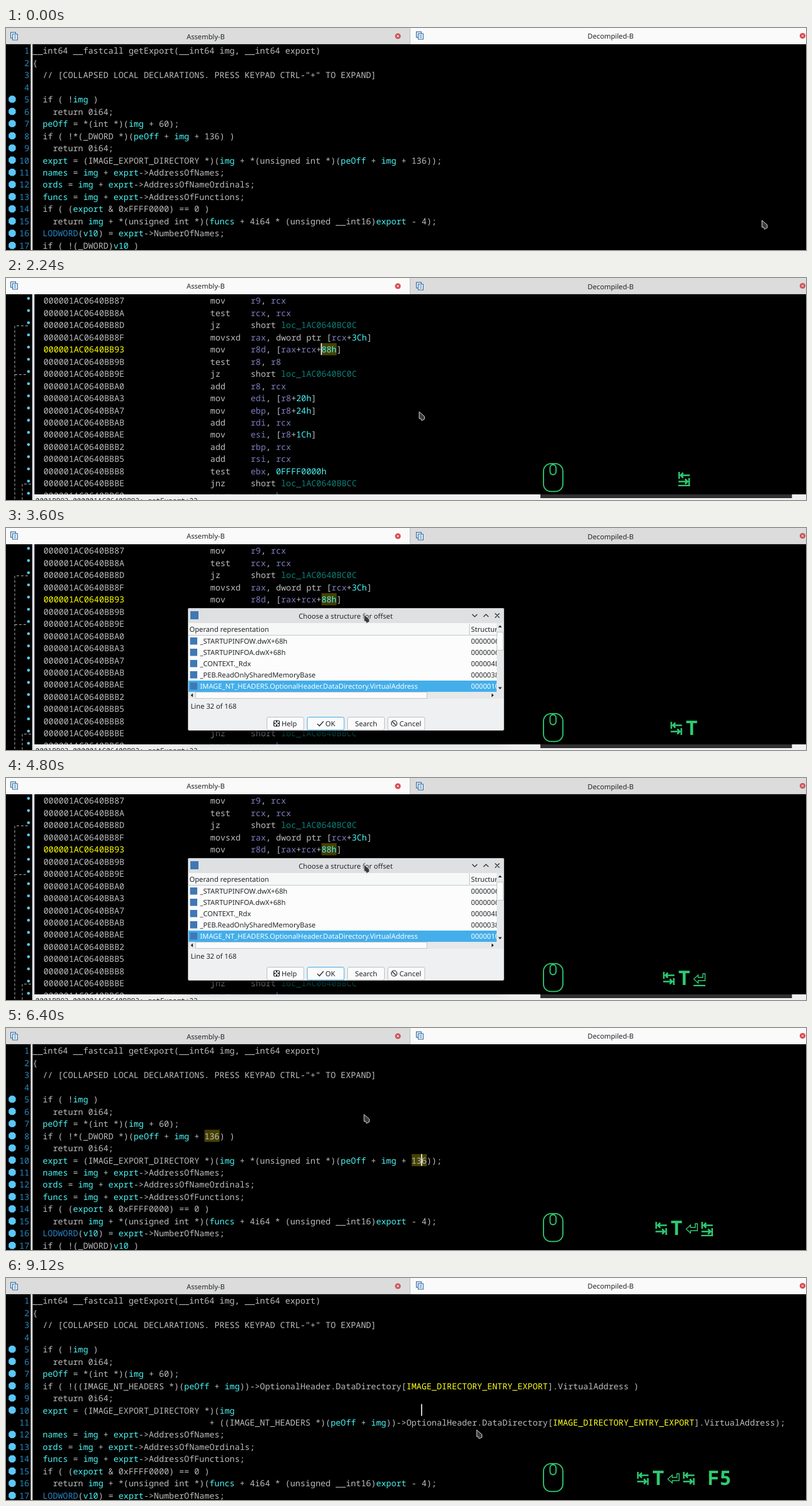
These frames come from a looping animation (1280x355 px, 9200 ms). An HTML page:

```html
<!DOCTYPE html>
<html lang="en">
<head>
<meta charset="utf-8">
<title>Structure offset demo</title>
<style>
  html, body { margin: 0; width: 100%; height: 100%; overflow: hidden; background: #000; }
  svg { display: block; width: 100vw; height: 100vh; }
  text { white-space: pre; text-rendering: geometricPrecision; font: 11.2px "Noto Sans", sans-serif; fill: #232629; }
  .mono { font: 13.477px "Noto Sans Mono", monospace; fill: #bdbdbd; }
  .var { fill: #4df3f3; }
  .macro { fill: #2a86c8; }
  .const { fill: #ffff20; }
  .reg { fill: #7d7dbd; }
  .loc { fill: #0c7f78; }
  .member { fill: #eeee86; }
  .num { fill: #2488c4; text-anchor: end; }
  .here { fill: #ffff00; }
  .mid { text-anchor: middle; }
  .picked { fill: #fff; }
  .status { font: 11.1px "Noto Sans Mono", monospace; }
  .key { font: bold 32px "Noto Sans Mono", monospace; fill: #2ecc71; text-anchor: middle; }
</style>
</head>
<body>
<svg id="stage" viewBox="0 0 1280 355"></svg>
<script>
const LOOP = 9200, STEP = 80;
const CHAR = 8.086, PITCH = 19.48, TOP = 26.3, CODE_X = 42.6, ASM_X = 60;
const GREEN = '#2ecc71', DARK = '#232629';

const rowTop = row => TOP + row * PITCH;
const rect = (x, y, w, h, fill, extra = '') =>
  `<rect x="${x}" y="${y}" width="${w}" height="${h}" fill="${fill}" ${extra}/>`;
const path = (d, stroke, width = 1, extra = 'fill="none"') =>
  `<path d="${d}" stroke="${stroke}" stroke-width="${width}" ${extra}/>`;
const text = (x, y, content, cls = '') => `<text x="${x}" y="${y}" class="${cls}">${content}</text>`;
const mono = (x, row, content, cls = '') => text(x, rowTop(row) + 14.9, content, 'mono ' + cls);
const group = (id, content) => `<g id="${id}">${content}</g>`;
const mark = (x, row, col, chars) => rect(x + col * CHAR, rowTop(row), chars * CHAR, 19.4, '#474100');
const caret = (x, row, col) => rect(x + col * CHAR - 1, rowTop(row), 1.6, 18.8, '#fff');
const paint = (line, rules) => rules.reduce(
  (out, [pattern, cls]) => out.replace(pattern, `<tspan class="${cls}">$&</tspan>`), line);

// Window tabs
function tab(x, width, label, labelX, closeX, active) {
  const dy = active ? 0 : 1;
  const icon = rect(8, 6.5, 8, 9, '#d9ecfa', 'stroke="#2d5f93"') +
    rect(11, 9.5, 8, 9, '#fff', 'stroke="#2d5f93"') + path('M13 12h4M13 14h4M13 16h4', '#3b8fd0');
  const cy = x ? 12.5 : 13;
  return rect(x, 0, width, 26, active ? '#fafafa' : '#dcdcdc') +
    `<g transform="translate(${x ? 648.5 : -.5} ${dy - .5})">${icon}</g>` +
    text(labelX, 17 + dy, label, 'mid') +
    `<circle cx="${closeX}" cy="${cy}" r="4.6" fill="${active ? '#d9474c' : '#c9545a'}"/>` +
    path(`M${closeX - 1.7} ${cy - 1.7}l3.4 3.4m0-3.4l-3.4 3.4`, '#fff');
}
const tabs = codeActive =>
  tab(0, 646, 'Assembly-B', 319.5, 627, !codeActive) +
  tab(646, 634, 'Decompiled-B', 967.5, 1274.5, codeActive) +
  path('M646.5 0V26', '#bcbebf') +
  path(codeActive ? 'M0 25.5H646' : 'M647 25.5H1280', '#c4c5c6');

// Decompiled code
const codeRules = [
  [/\b(img|peOff|exprt|names|ords|funcs|export|v10)\b/g, 'var'],
  [/LODWORD/g, 'macro'],
  [/IMAGE_DIRECTORY_ENTRY_EXPORT/g, 'const']
];
const codeBefore = `__int64 __fastcall getExport(__int64 img, __int64 export)
{
  // [COLLAPSED LOCAL DECLARATIONS. PRESS KEYPAD CTRL-"+" TO EXPAND]

  if ( !img )
    return 0i64;
  peOff = *(int *)(img + 60);
  if ( !*(_DWORD *)(peOff + img + 136) )
    return 0i64;
  exprt = (IMAGE_EXPORT_DIRECTORY *)(img + *(unsigned int *)(peOff + img + 136));
  names = img + exprt->AddressOfNames;
  ords = img + exprt->AddressOfNameOrdinals;
  funcs = img + exprt->AddressOfFunctions;
  if ( (export & 0xFFFF0000) == 0 )
    return img + *(unsigned int *)(funcs + 4i64 * (unsigned __int16)export - 4);
  LODWORD(v10) = exprt->NumberOfNames;
  if ( !(_DWORD)v10 )`.split('\n');
const field = '((IMAGE_NT_HEADERS *)(peOff + img))->OptionalHeader.DataDirectory[IMAGE_DIRECTORY_ENTRY_EXPORT].VirtualAddress';
const codeAfter = [
  ...codeBefore.slice(0, 7),
  `  if ( !${field} )`,
  codeBefore[8],
  '  exprt = (IMAGE_EXPORT_DIRECTORY *)(img',
  ' '.repeat(35) + `+ ${field});`,
  ...codeBefore.slice(10, 16)
];

function codeView(lines) {
  const rows = lines.map((line, row) => {
    const hasDot = row > 3 && !line.startsWith('     ');
    const y = rowTop(row) + 9.7;
    return (hasDot ? `<path d="M7.4 ${y - 5.7}h5l3.2 3.2v5l-3.2 3.2h-5l-3.2-3.2v-5z" fill="#5bc8fa"/>` : '') +
      mono(37.3, row, row + 1, 'num') +
      mono(CODE_X, row, row ? paint(line, codeRules) : line);
  });
  return rect(39.5, 26, 3, 329, '#e4e4e4') + rows.join('') + tabs(true);
}

// Disassembly
const asmRules = [
  [/\b(r\d+d?|r[a-z]{2}|e[a-z]{2}|bx)\b/g, 'reg'],
  [/\b[0-9A-F]+h\b/g, 'var'],
  [/loc_\w+/g, 'loc'],
  [/IMAGE_NT[\w.]+/g, 'member']
];
const structPath = 'IMAGE_NT_HEADERS.OptionalHeader.DataDirectory.VirtualAddress';
const asmLines = operand => `87 mov r9, rcx
8A test rcx, rcx
8D jz short loc_1AC0640BC0C
8F movsxd rax, dword ptr [rcx+3Ch]
93 mov r8d, [rax+rcx+${operand}]
9B test r8, r8
9E jz short loc_1AC0640BC0C
A0 add r8, rcx
A3 mov edi, [r8+20h]
A7 mov ebp, [r8+24h]
AB add rdi, rcx
AE mov esi, [r8+1Ch]
B2 add rbp, rcx
B5 add rsi, rcx
B8 test ebx, 0FFFF0000h
BE jnz short loc_1AC0640BBCC
C0 movzx eax, bx`.split('\n');

function asmView(operand, markChars) {
  const rows = asmLines(operand).map((line, row) => {
    const [, low, op, args] = line.match(/^(\S+) (\S+) (.*)$/);
    return `<circle cx="36" cy="${rowTop(row) + 6.3}" r="2.3" fill="#5bc8fa"/>` +
      mono(ASM_X, row, '000001AC0640BB' + low, row === 4 ? 'here' : '') +
      mono(ASM_X + 33 * CHAR, row, op) +
      mono(ASM_X + 41 * CHAR, row, paint(args, asmRules));
  });
  return rect(42, 26, 3.5, 329, '#dfe3e6') +
    path('M35 76.5H14V355M14 154.5H35M40 329.5H26V355', '#b0b0b0', 1, 'fill="none" stroke-dasharray="4 3"') +
    mark(ASM_X, 4, 55, markChars) + rows.join('') +
    rect(45, 346, 1235, 9, '#eff0f1') +
    text(47, 359.5, '0001BB93 000001AC0640BB93: getExport+23', 'status') +
    tabs(false);
}

// Structure chooser
function dialogView() {
  const square = (x, y, size) => rect(x, y, size, size, '#3f78b5');
  const list = [
    ['_STARTUPINFOW.dwX+68h', '00000068'],
    ['_STARTUPINFOA.dwX+68h', '00000068'],
    ['_CONTEXT._Rdx', '000004D0'],
    ['_PEB.ReadOnlySharedMemoryBase', '00000380'],
    ['IMAGE_NT_HEADERS.OptionalHeader.DataDirectory.VirtualAddress', '00000108']
  ].map(([name, size], i) => {
    const y = 172 + i * 18, picked = i === 4;
    return (picked ? rect(292, y, 493, 18, '#43aeea') : '') + square(294.5, y + 3, 11.5) +
      [[310.5, name], [744, size]].map(([x, s]) => text(x, y + 13, s, picked ? 'picked' : '')).join('');
  }).join('');
  const button = (x, label, labelX, border = '#bcbfc1') =>
    rect(x + .5, 302.5, 59, 20.5, '#fbfbfc', `rx="2.5" stroke="${border}"`) + text(labelX, 317, label);
  return rect(291, 128, 506, 196, '#eff0f1', 'rx="3" style="filter:drop-shadow(0 8px 10px rgba(0,0,0,.9))"') +
    rect(291, 128, 506, 24, '#dee0e2', 'rx="3"') + square(295, 133, 13) +
    text(543.5, 144.5, 'Choose a structure for offset', 'mid') +
    path('M746 138l4 4 4-4M764 142l4-4 4 4M782.5 136.5l7 7m0-7l-7 7', DARK, 1.2) +
    rect(292, 152, 493, 110, '#fcfcfc') + rect(292, 152, 493, 20, '#f6f7f7') +
    path('M292 171.5H785M741.5 153V172', '#c5c8ca') +
    text(293.5, 166, 'Operand representation') +
    `<g clip-path="url(#list)">${text(744, 166, 'Structure size')}${list}</g>` +
    rect(785, 152, 11, 110, '#e6e8e9') + rect(785.5, 166.5, 10, 29, '#fcfcfc', 'stroke="#c2c5c7"') +
    rect(292, 262, 504, 11, '#e6e8e9') + rect(303.5, 262.5, 370, 10, '#fcfcfc', 'stroke="#c2c5c7"') +
    `<path d="M787.5 159l3-3.5 3 3.5zM787.5 254.5l3 3.5 3-3.5zM299 264.5l-3.5 3 3.5 3zM777 264.5l3.5 3-3.5 3z" fill="${DARK}"/>` +
    rect(291.5, 128.5, 505, 195, 'none', 'rx="3" stroke="#b9bcbe"') +
    text(295.5, 288.5, 'Line 32 of 168') +
    button(417, 'Help', 441) + button(481.5, 'OK', 511, '#3daee9') +
    button(546, 'Search', 558.5) + button(610.5, 'Cancel', 629.5) +
    rect(428.5, 308, 9, 9, 'none', `rx="2" stroke="${DARK}" stroke-width="1.2"`) +
    path('M433 308v3M433 314v3M428.5 312.5h3M434.5 312.5h3', DARK, 2) +
    path('M498 313l3.5 3.5 6.5-7.5', DARK, 1.2) +
    `<circle cx="621" cy="312.5" r="4.5" fill="none" stroke="${DARK}" stroke-width="1.2"/>` +
    path('M618 309.5l6 6', DARK, 1.2);
}

// On-screen input display
const mouseIcon =
  rect(860, 296.8, 31, 44.6, 'none', `rx="12" stroke="${GREEN}" stroke-width="1.8"`) +
  group('press', `<path d="M875 296H872Q859 296 859 309V318H875Z" fill="${GREEN}"/>`) +
  rect(870.5, 298.5, 9.5, 16, '#000', `rx="4.7" stroke="${GREEN}" stroke-width="1.8"`) +
  path('M875.3 297v2', GREEN, 1.8);
const glyphs = {
  tab: path('M-8-10V1M9-4.5H-5M-1.5-8.5L-5.5-4.5L-1.5-.5M8 0V11M-9 5.5H5M1.5 1.5L5.5 5.5L1.5 9.5', GREEN, 2.5),
  enter: path('M5.5-7H9V4H-2V8L-9 1.5L-2-5V-1H5.5Z', GREEN, 1.4)
};
const presses = [
  { at: 2160, until: 2400, x: 1085, keys: ['tab'] },
  { at: 3440, until: 3600, x: 1072.5, keys: ['tab', 'T'] },
  { at: 4800, until: 4960, x: 1060.5, keys: ['tab', 'T', 'enter'] },
  { at: 6400, until: 6480, x: 1048.3, keys: ['tab', 'T', 'enter', 'tab'] },
  { at: 7520, until: 7680, x: 1019, keys: ['tab', 'T', 'enter', 'tab', ' ', 'F5'] }
];
function keysView(t) {
  const press = presses.filter(p => t >= p.at).pop();
  if (!press) return '';
  const { x, keys, until } = press, last = keys.length - 1;
  const half = keys[last] === 'F5' ? 19 : 9.5;
  return keys.map((key, i) => `<g transform="translate(${x + i * 24.5} 320)">` +
    (glyphs[key] || text(0, 11, key, 'key')) +
    (i === last && t < until ? rect(-half, 10.8, 2 * half, 2.2, GREEN) : '') + '</g>').join('');
}

document.getElementById('stage').innerHTML =
  '<clipPath id="list"><rect x="292" y="152" width="493" height="110"/></clipPath>' +
  rect(0, 0, 1280, 355, '#000') +
  group('before', group('marks', mark(CODE_X, 7, 34, 3) + mark(CODE_X, 9, 75, 3)) + codeView(codeBefore)) +
  group('after', codeView(codeAfter)) +
  group('asm', asmView('88h', 3)) +
  group('asmStruct', asmView(structPath, 16)) +
  group('codeCaret', caret(CODE_X, 9, 77)) +
  group('asmCaret', caret(ASM_X, 4, 55)) +
  group('input', rect(855, 290, 402.5, 62, '#000', 'opacity=".8"') + mouseIcon + group('keys', '')) +
  group('dialog', dialogView()) +
  group('tip', rect(676.5, 232.5, 26, 21, '#2a0a12', 'stroke="#c4c4c4"') + text(677.3, 247.3, 'int', 'mono here')) +
  group('pointer', path('M.6.6V11.6L3 11.4L4.6 14.7L9 12.4V8Z', '#d8d8d8', 1, 'fill="#3c3c3c" stroke-linejoin="round"'));

const part = Object.fromEntries([...document.querySelectorAll('g[id]')].map(g => [g.id, g]));
const show = (id, on) => { part[id].style.display = on ? '' : 'none'; };
const clamp = v => Math.min(1, Math.max(0, v));
const ease = v => v * v * (3 - 2 * v);

const moves = [
  { from: 0, to: 880, a: [1209, 307], b: [660.5, 213.3] },
  { from: 2640, to: 2960, a: [660.5, 213.3], b: [572.3, 137.7] },
  { from: 8880, to: 9120, a: [572.3, 137.7], b: [752.5, 242.3] }
];
function pointerAt(t) {
  const { from, to, a, b } = moves.filter(m => t >= m.from).pop();
  const k = ease(clamp((t - from) / (to - from)));
  return a.map((v, i) => v + (b[i] - v) * k);
}

function render(t) {
  const within = (a, b) => t >= a && t < b;
  const blink = start => Math.floor((t - start) / 320) % 2 === 0;
  show('before', t < 2240 || within(6400, 7600));
  show('after', t >= 7600);
  show('asm', within(2240, 4880));
  show('asmStruct', within(4880, 6400));
  show('marks', t >= 880);
  show('codeCaret', within(880, 2240) && blink(2000) || t >= 6400 && blink(6400));
  show('asmCaret', within(2240, 3520) && blink(2240) || within(4880, 6400) && blink(5120));
  show('input', t >= 880);
  show('press', within(880, 1120));
  show('dialog', within(3520, 4880));
  show('tip', within(1200, 2160));
  part.tip.style.opacity = clamp((t - 1120) / 320);
  part.keys.innerHTML = keysView(t);
  part.pointer.setAttribute('transform', `translate(${pointerAt(t)})`);
}

function frame() {
  render(Math.floor(performance.now() % LOOP / STEP) * STEP);
  requestAnimationFrame(frame);
}
frame();
</script>
</body>
</html>
```
